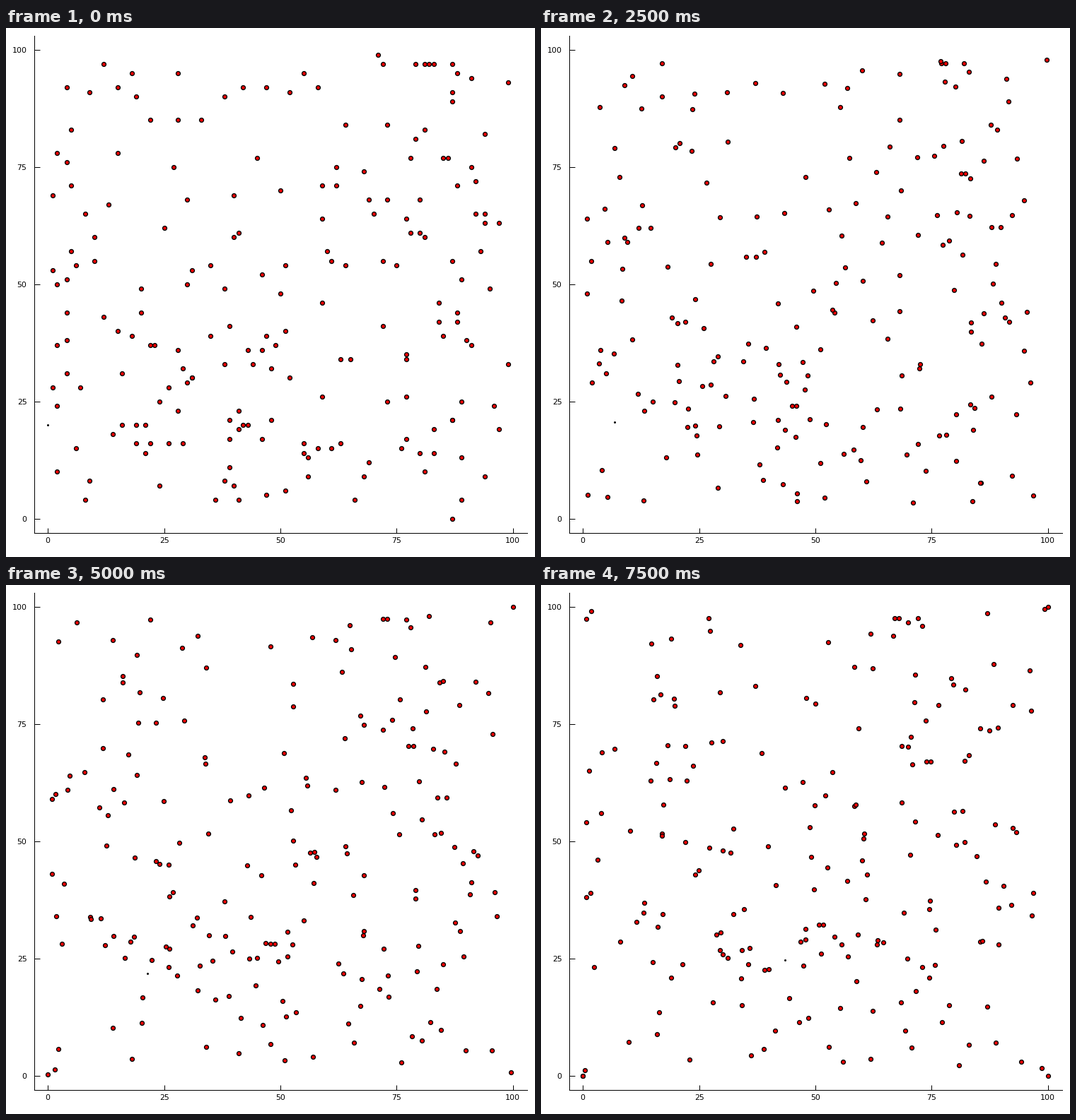
Animation of 748 by 749 pixels, one loop 8 s. Source, as a matplotlib script:

```python
import random

import matplotlib.pyplot as plt
import numpy as np
from matplotlib.animation import FuncAnimation

W, H, DPI = 748, 749, 64
PX = 72 / DPI                      # points per pixel
FRAMES, STEP_MS = 16, 500
COUNT = 200
LEFT, RIGHT, TOP, BOTTOM = 39.5, 736.5, 11, 714.5

# Start points of the outer dots, keyed by the corner they head for.
OUTER = {
    (0, 0): [(18, 95), (58, 92), (71, 99), (81, 97), (79, 81), (81, 83),
             (85, 77), (86, 77), (92, 65), (94, 65), (93, 57), (2, 10),
             (6, 15), (9, 8), (1, 69), (1, 53), (4, 38)],
    (100, 0): [(9, 91), (28, 95), (79, 97), (91, 94), (87, 89), (87, 55),
               (89, 51), (95, 49), (94, 9), (8, 4), (4, 76), (2, 37)],
    (0, 100): [(15, 92), (42, 92), (82, 97), (83, 97), (87, 97), (88, 95),
               (73, 84), (94, 82), (91, 75), (97, 63), (87, 0), (89, 4),
               (2, 50), (6, 54), (10, 55), (4, 31), (2, 24), (97, 19),
               (99, 33)],
    (100, 100): [(12, 97), (4, 92), (19, 90), (38, 90), (47, 92), (52, 91),
                 (55, 95), (72, 97), (87, 91), (99, 93), (78, 77), (92, 72),
                 (94, 63), (5, 57), (4, 51), (10, 60), (8, 65), (2, 78),
                 (1, 28), (96, 24), (91, 37), (90, 38)],
}


def make_dots():
    """Return start points and goals; the inner field is scattered at random."""
    dots = [(p, goal) for goal, pts in OUTER.items() for p in pts]
    outer = [p for p, _ in dots]
    goals = list(OUTER)
    rng = random.Random(20)
    while len(dots) < COUNT:
        x, y = rng.randint(4, 90), rng.randint(4, 85)
        if all(np.hypot(x - u, y - v) > 4 for u, v in outer):
            dots.append(((x, y), rng.choice(goals)))
    start, goal = zip(*dots)
    return np.array(start, float), np.array(goal, float)


start, goal = make_dots()
gap = goal - start
dist = np.hypot(gap[:, 0], gap[:, 1])

# Path of the small black dot: step, x, y
WALK = np.array([(0, 0, 20), (2, 1.9, 20.2), (4, 4.9, 20.5), (6, 8.8, 20.75),
                 (8, 14.7, 21.3), (10, 21.4, 21.8), (13, 35.1, 19.9),
                 (15, 43.4, 24.65)]).T

fig = plt.figure(figsize=(W / DPI, H / DPI), dpi=DPI, facecolor="white")
ax = fig.add_axes([LEFT / W, 1 - BOTTOM / H, (RIGHT - LEFT) / W,
                   (BOTTOM - TOP) / H])
ax.set(xlim=(-3, 103), ylim=(-3, 103))
ax.patch.set_visible(False)
ticks = range(0, 101, 25)
ax.set_xticks(ticks)
ax.set_yticks(ticks)
ax.tick_params(direction="in", length=7.5 * PX, width=PX, pad=6.5 * PX)
ax.tick_params(axis="y", pad=10 * PX)
for side, spine in ax.spines.items():
    spine.set_visible(side in ("left", "bottom"))
    spine.set_linewidth(PX)
for label in ax.get_xticklabels() + ax.get_yticklabels():
    label.set(family="DejaVu Sans", size=11 * PX)

dots, = ax.plot([], [], "o", color="red", markeredgecolor="black",
                markersize=5.8 * PX, markeredgewidth=1.4 * PX, clip_on=False)
walker, = ax.plot([], [], "o", color="black", markersize=3 * PX,
                  markeredgewidth=0, zorder=3)


def draw(k):
    part = np.minimum(k / dist, 1)     # one unit per step, stop at the corner
    dots.set_data(*(start + gap * part[:, None]).T)
    walker.set_data([np.interp(k, WALK[0], WALK[1])],
                    [np.interp(k, WALK[0], WALK[2])])
    return dots, walker


anim = FuncAnimation(fig, draw, frames=FRAMES, interval=STEP_MS, repeat=True,
                     repeat_delay=0)
plt.show()
```
